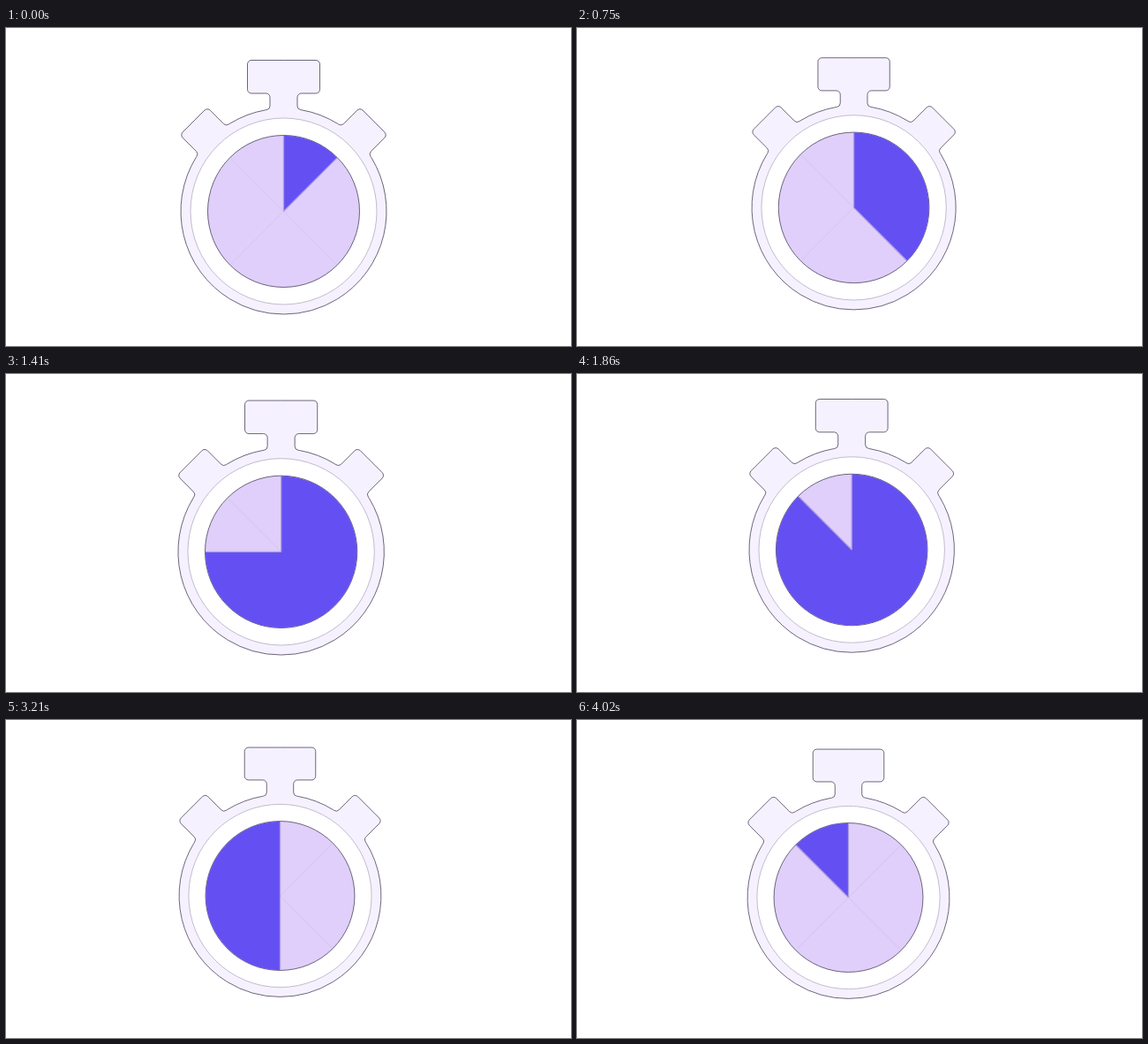
An HTML page with a canvas for the animation above (4050 ms loop, 640 by 360 pixels).

```html
<!DOCTYPE html>
<html lang="en">
<head>
<meta charset="utf-8">
<title>Stopwatch</title>
<style>
  html, body { margin: 0; width: 100%; height: 100%; overflow: hidden; background: #fff; }
  canvas { display: block; width: 640px; height: 360px; }
</style>
</head>
<body>
<canvas id="stage" width="640" height="360"></canvas>
<script>
const ctx = document.getElementById('stage').getContext('2d');
const LOOP = 4050, SECTORS = 8, STEPS = 2 * SECTORS - 1, BEAT = LOOP / STEPS;
const TAU = Math.PI * 2, TURN = TAU / SECTORS;
const RIM = 116.5, FACE = 105.5, PIE = 86, TOP = 171;
const LIGHT = '#dfcffa', DARK = '#6450f2', BODY = '#f6f1fe', LINE = '#48425a';

// the watch drifts between a few resting places
const KEYS = [
  { t: 0, x: 314.5, y: 207.5, r: 116.5 },
  { t: 450, x: 315.2, y: 203.5, r: 114 },
  { t: 1050, x: 312, y: 203.2, r: 117.1 },
  { t: 1860, x: 311.2, y: 199, r: 116.2 },
  { t: 2430, x: 309, y: 197.5, r: 114.8 },
  { t: 3210, x: 310.5, y: 199, r: 114.4 },
  { t: 3810, x: 307.5, y: 201, r: 114.4 }
];

function poseAt(t) {
  const i = KEYS.findIndex(key => key.t > t);
  if (i < 0) return KEYS[KEYS.length - 1];
  const a = KEYS[i - 1], b = KEYS[i];
  const k = (t - a.t) / (b.t - a.t);
  const mix = name => a[name] + (b[name] - a[name]) * k;
  return { x: mix('x'), y: mix('y'), r: mix('r') };
}

// angle measured clockwise from twelve o'clock
const polar = (angle, r) => [r * Math.sin(angle), -r * Math.cos(angle)];

// right half of the case; the left half is its mirror image
function makeHalf() {
  const path = new Path2D();
  const gap = 0.045;

  // a rounded knob on the rim: stem, then a head reaching out to the given height
  const round = list => {
    for (let i = 0; i < list.length - 1; i++) path.arcTo(...list[i], ...list[i + 1], 4.5);
  };
  const rim = (from, to) => path.arc(0, 0, RIM, from - TAU / 4, to - TAU / 4);

  const headHalf = 41, headBase = TOP - 37.5, stemHalf = 15.5;
  const stem = Math.asin(stemHalf / RIM);
  path.moveTo(0, -TOP);
  round([
    [headHalf, -TOP], [headHalf, -headBase], [stemHalf, -headBase],
    polar(stem, RIM), polar(stem + gap, RIM)
  ]);

  const half = 22, reach = 144.2, mid = TAU / 8;
  const base = Math.asin(half / RIM), tip = Math.atan2(half, reach);
  const far = Math.hypot(half, reach);
  rim(stem + gap, mid - base - gap);
  round([
    polar(mid - base, RIM), polar(mid - tip, far), polar(mid + tip, far),
    polar(mid + base, RIM), polar(mid + base + gap, RIM)
  ]);
  rim(mid + base + gap, TAU / 2);
  return path;
}
const HALF = makeHalf();

function mirrored(paint) {
  paint();
  ctx.save();
  ctx.scale(-1, 1);
  paint();
  ctx.restore();
}

function drawCase() {
  ctx.fillStyle = BODY;
  mirrored(() => ctx.fill(HALF));
  ctx.fillRect(-1, -TOP, 2, TOP + RIM);
  ctx.strokeStyle = LINE;
  ctx.lineWidth = 0.8;
  mirrored(() => ctx.stroke(HALF));
}

function disc(r, fill, stroke) {
  ctx.beginPath();
  ctx.arc(0, 0, r, 0, TAU);
  ctx.fillStyle = fill;
  ctx.fill();
  ctx.strokeStyle = stroke;
  ctx.lineWidth = 0.8;
  ctx.stroke();
}

function seam(i, color) {
  ctx.beginPath();
  ctx.moveTo(0, 0);
  ctx.lineTo(...polar(i * TURN, PIE - 1));
  ctx.strokeStyle = color;
  ctx.lineWidth = 1.3;
  ctx.stroke();
}

// sectors fill one by one, then empty in the same order
function drawPie(step) {
  const from = Math.max(0, step - SECTORS + 1);
  const to = Math.min(SECTORS, step + 1);

  disc(PIE, LIGHT, LINE);
  for (let i = 1; i < SECTORS; i += 2) seam(i, '#dac9f5');

  ctx.beginPath();
  ctx.moveTo(0, 0);
  ctx.arc(0, 0, PIE - 0.3, from * TURN - TAU / 4, to * TURN - TAU / 4);
  ctx.fillStyle = DARK;
  ctx.fill();
  if (to - from < SECTORS) [from, to].forEach(i => seam(i, '#ab9ddd'));
}

function draw(t) {
  const { x, y, r } = poseAt(t);
  const s = r / RIM;
  ctx.setTransform(1, 0, 0, 1, 0, 0);
  ctx.fillStyle = '#fff';
  ctx.fillRect(0, 0, 640, 360);
  ctx.setTransform(s, 0, 0, s, x, y);
  drawCase();
  disc(FACE, '#fff', '#b3acc0');
  drawPie(Math.floor((t + 0.5) / BEAT) % STEPS);
}

const start = performance.now();
function tick() {
  draw(Math.max(0, performance.now() - start) % LOOP);
  requestAnimationFrame(tick);
}
tick();
</script>
</body>
</html>
```
